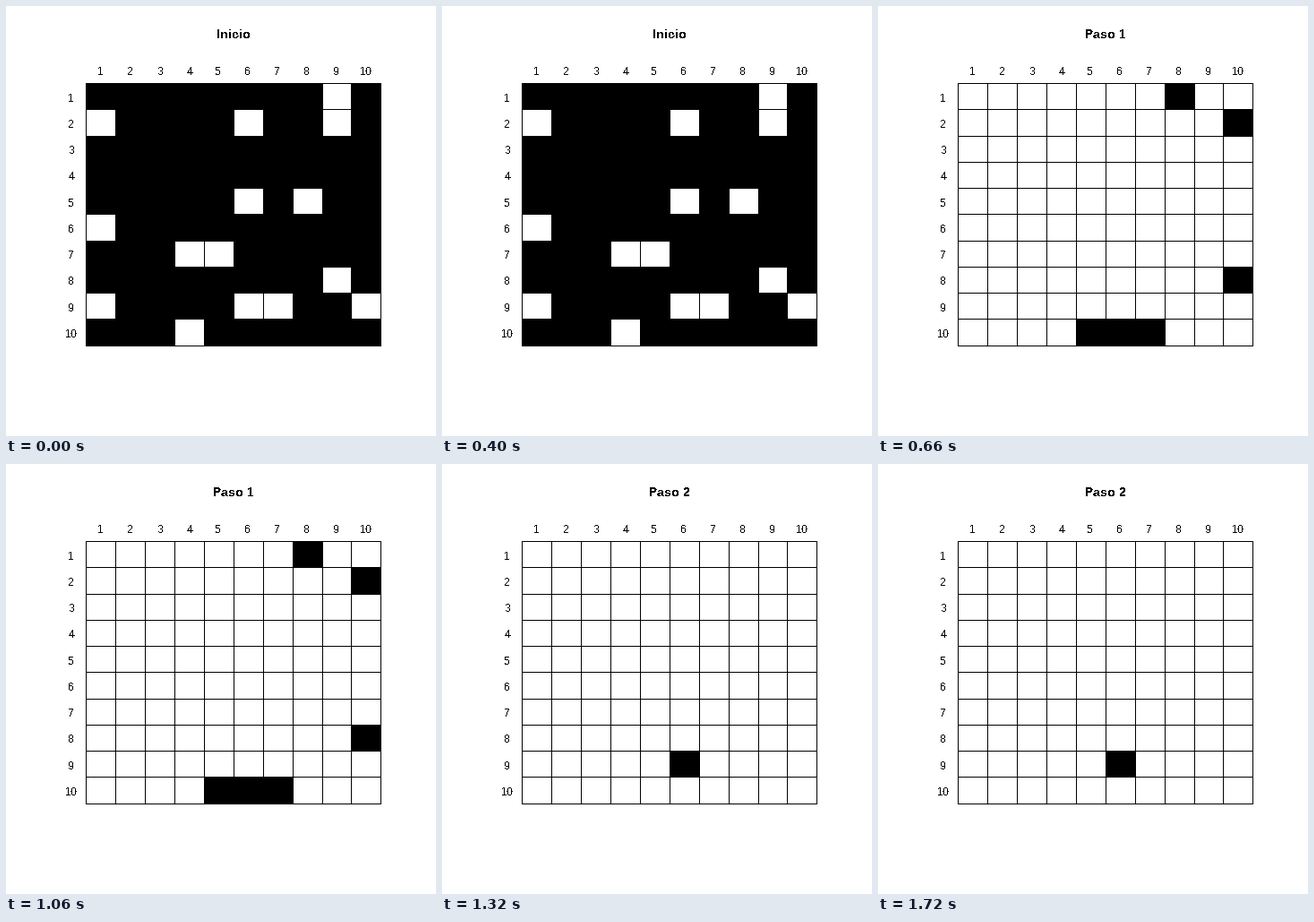
These frames come from a looping animation (480x480 px, 1980 ms). A matplotlib script:

```python
import math

import matplotlib.pyplot as plt
import numpy as np
from matplotlib.animation import FuncAnimation
from matplotlib.patches import Rectangle

plt.rcParams.update({
    "font.family": "Liberation Sans",
    "text.hinting": "native",
    "text.hinting_factor": 1,
    "text.antialiased": False,
})

SIZE, N, STEPS = 480, 10, 3
CX, CY = 254.4, 232.8              # centre of the plot region
DX, DY = 390.72 / 11.88, 347.52 / 11.88

# Dead cells at the start: row -> columns
DEAD = {1: [9], 2: [1, 6, 9], 5: [6, 8], 6: [1], 7: [4, 5],
        8: [9], 9: [1, 6, 7, 10], 10: [4]}


def first_board():
    board = np.ones((N, N), dtype=int)
    for row, cols in DEAD.items():
        board[row - 1, np.array(cols) - 1] = 0
    return board


def next_board(board):
    """A cell lives on, or is born, with exactly three living neighbours."""
    pad = np.pad(board, 1)
    around = sum(pad[r:r + N, c:c + N] for r in range(3) for c in range(3))
    return (around - board == 3).astype(int)


def px(col):
    return math.floor(CX + (col - 5.5) * DX)


def py(row):
    return math.floor(CY + (row - 5.5) * DY)


def box(x0, y0, x1, y1, color):
    patch = Rectangle((x0, y0), x1 - x0, y1 - y0, facecolor=color,
                      linewidth=0, antialiased=False)
    return ax.add_patch(patch)


def write(x, y, text, size, **style):
    # The small shift makes half pixels round to the left.
    return ax.text(x - 0.25, y, text, fontsize=size, ha="center",
                   va="baseline", **style)


boards = [first_board()]
while len(boards) < STEPS:
    boards.append(next_board(boards[-1]))

fig = plt.figure(figsize=(SIZE / 72, SIZE / 72), dpi=72, facecolor="white")
ax = fig.add_axes([0, 0, 1, 1])
ax.set_xlim(0, SIZE)
ax.set_ylim(SIZE, 0)
ax.axis("off")

# A black board; the gaps between cells form the grid lines.
box(px(0.5), py(0.5), px(N + 0.5) + 1, py(N + 0.5) + 1, "black")
cells = [box(px(c + 0.5) + 1, py(r + 0.5) + 1, px(c + 1.5), py(r + 1.5),
             "white")
         for r in range(N) for c in range(N)]
for k in range(1, N + 1):
    write(px(k), py(0) + 6, str(k), 12)
    write(px(0), py(k) + 6, str(k), 12)
title = write(px(5.5), 36, "", 14, weight="bold")


def draw(i):
    title.set_text(f"Paso {i}" if i else "Inicio")
    for cell, alive in zip(cells, boards[i].flat):
        cell.set_facecolor("black" if alive else "white")
    return [title, *cells]


anim = FuncAnimation(fig, draw, frames=STEPS, interval=660,
                     repeat=True, repeat_delay=0, blit=False)
plt.show()
```
